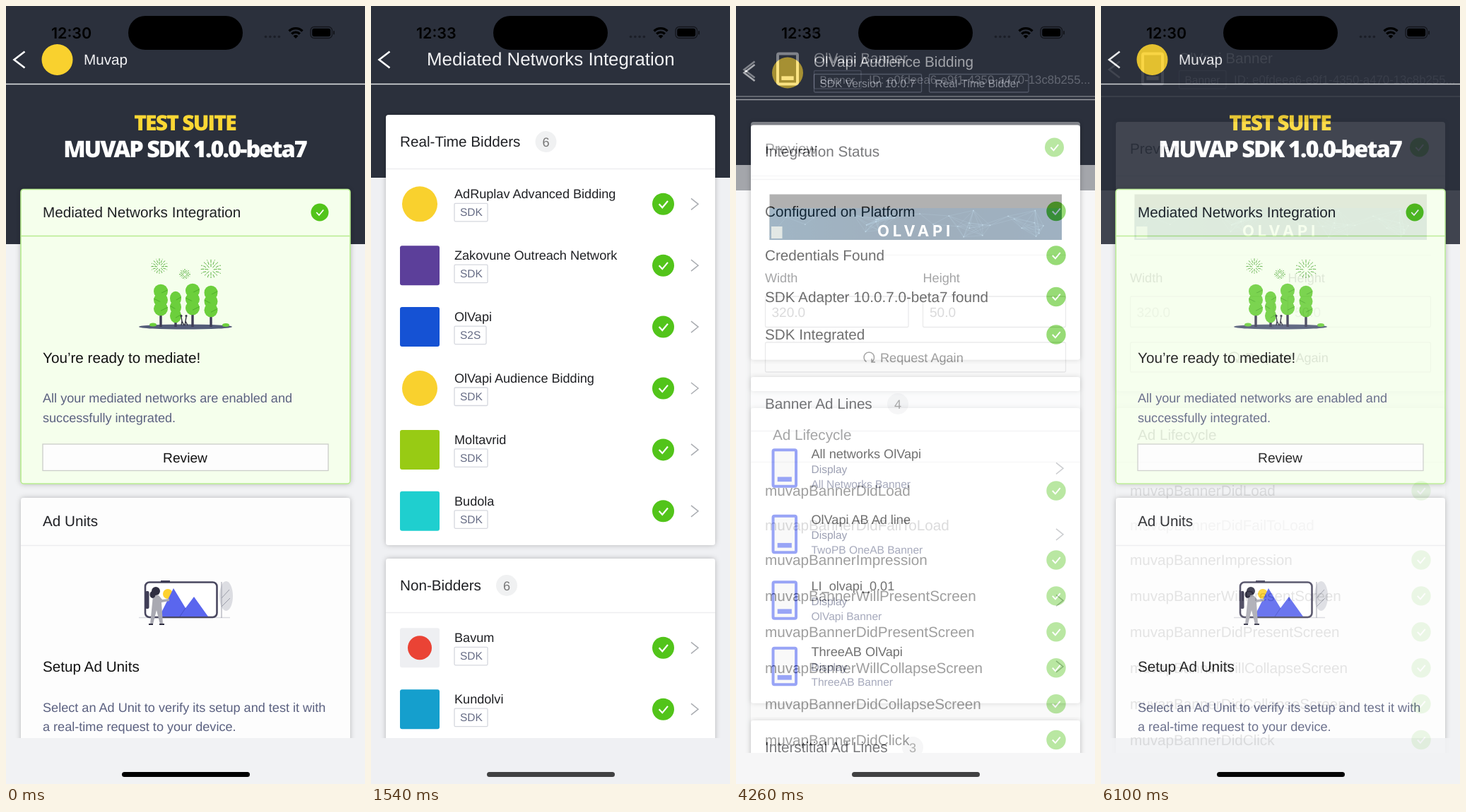
Recreate the animation shown at these times as an HTML page. Size 508 by 1101 pixels, loop 6.16 s.

```html
<!DOCTYPE html>
<html lang="en">
<head>
<meta charset="utf-8">
<title>Test suite walkthrough</title>
<style>
html, body { margin: 0; width: 100%; height: 100%; overflow: hidden; background: #2b303c; }
svg { display: block; width: 100vw; height: 100vh; }
text { font-family: "Liberation Sans", Arial, sans-serif; text-rendering: geometricPrecision; white-space: pre; }
.clock { font-family: Inter, sans-serif; font-weight: 600; }
.logo { font-family: Inter, sans-serif; font-weight: 700; letter-spacing: 4.8px; }
.title { font-family: "Open Sans", "Noto Sans", sans-serif; font-weight: 800; letter-spacing: -.06em; }
</style>
</head>
<body>
<svg id="stage" viewBox="0 0 508 1101" preserveAspectRatio="none" xmlns="http://www.w3.org/2000/svg"></svg>
<script>
const W = 508, H = 1101;
const DARK = '#2b303c', INK = '#1f2024', MUTED = '#5b6180', GREEN = '#52c41a',
      YELLOW = '#f9d12e', BLUE = '#5468f0', PALE = '#ededf0';
const SMALL = 15.5, BODY = 18.1, HEAD = 20.68, BIG = 25.85;

// Drawing helpers
const text = (x, y, size, str, fill = INK, more = '') =>
  `<text x="${x}" y="${y}" font-size="${size}" fill="${fill}" ${more}>${str}</text>`;
const title = (y, size, str, fill) =>
  text(253, y, size, str, fill, 'class="title" text-anchor="middle"');
const rect = (x, y, w, h, fill, more = '') =>
  `<rect x="${x}" y="${y}" width="${w}" height="${h}" fill="${fill}" ${more}/>`;
const circle = (x, y, r, fill, more = '') =>
  `<circle cx="${x}" cy="${y}" r="${r}" fill="${fill}" ${more}/>`;
const ellipse = (x, y, rx, ry, fill, more = '') =>
  `<ellipse cx="${x}" cy="${y}" rx="${rx}" ry="${ry}" fill="${fill}" ${more}/>`;
const path = (d, stroke, width, fill = 'none', more = '') =>
  `<path d="${d}" stroke="${stroke}" stroke-width="${width}" fill="${fill}" ${more}/>`;
const hline = (y, x1 = 21, x2 = 487, color = PALE, width = 1.3) =>
  path(`M${x1} ${y}H${x2}`, color, width);

const check = (x, y, r) => circle(x, y, r, GREEN) +
  path(`M${x - r * .38} ${y}l${r * .3} ${r * .32}l${r * .5} ${-r * .6}`, '#fff', r * .14);
const chevron = (x, y) => path(`M${x} ${y - 8}l10 8l-10 8`, '#aaadb2', 1.5);
const back = y => path(`M26.5 ${y - 11.5}L11.5 ${y}L26.5 ${y + 11.5}`, '#fff', 2.6);
const badge = (x, y, n) => circle(x, y, 15, '#f0f1f2') +
  text(x, y + 6.5, BODY, n, '#777', 'text-anchor="middle"');
const card = (y, h, fill = '#fff', more = '') =>
  rect(21, y, 466, h, fill, `rx="4" filter="url(#shadow)" ${more}`);
const tag = (x, y, w, str, stroke, fill) =>
  rect(x, y, w, 25.5, 'none', `rx="1.5" stroke="${stroke}" stroke-width="1.3"`) +
  text(x + 8, y + 18, SMALL, str, fill);
const device = (x, y, w, h, color, fill) =>
  rect(x, y, w, h, fill, `rx="2" stroke="${color}" stroke-width="4"`) +
  rect(x + w * .19, y + h * .74, w * .62, h * .13, color);

const page = (bg, dark, line) =>
  rect(0, 0, W, H, bg) + rect(0, 0, W, dark, DARK) + hline(line, 0, W, '#e4e5e8', 1.6);
const frame = (y, bg, clock, pill) =>
  rect(0, y, W, H - y, bg) + rect(164, 1084, 181, 7, pill, 'rx="3.5"') +
  text(64, 46, 21.5, clock, '#000', 'class="clock"');

// Illustrations
function firework(x, y, r) {
  let d = '';
  for (let k = 0; k < 16; k++) {
    const a = k * Math.PI / 8, c = Math.cos(a), s = Math.sin(a);
    const inner = r * (k % 2 ? .5 : .25), outer = r * (s > .5 ? .8 : 1);
    d += `M${x + c * inner} ${y + s * inner}Q${x + c * r * .8} ${y + s * r * .8 - r * .1} ` +
      `${x + c * outer} ${y + s * outer}`;
  }
  return path(d, '#55ad3c', 1, 'none', `stroke-dasharray="${r * .3} 1.3"`);
}

function tree(x, top, r) {
  let out = rect(x - 1.7, top + 30, 3.4, 454 - top - 30, '#3f3d56');
  [.22, .5, .78].forEach((f, i) => {
    const y = top + 44 * f;
    out += ellipse(x, y, r, 10, '#6ccf3c') +
      path(`M${x} ${y + 3}l${i % 2 ? -r : r} -5`, '#4fae2b', 1);
  });
  return out;
}

const park = () =>
  firework(217, 369, 12) + firework(253, 380, 8) + firework(290, 373, 15) +
  ellipse(254, 454, 66, 3.6, '#535b78') +
  ellipse(208, 451, 5, 2.5, '#6ccf3c') + ellipse(311, 451.5, 5, 2.5, '#6ccf3c') +
  tree(219, 394, 10) + tree(240, 404, 8) + tree(264, 393, 10) + tree(290, 396, 9.5) +
  path('M248 440l1 6l-1 6M249 446l3 6M255 440l-1 6l-1 6M254 446l3 6', '#2f2e41', 1.4) +
  circle(248, 438.5, 1.5, '#2f2e41') + circle(255, 438.5, 1.5, '#2f2e41');

const gallery = () =>
  hline(865.5, 188, 317, '#d9dae0') +
  ellipse(311.5, 835, 9.5, 21, '#dcdde2') +
  path('M305 815V866M305 850l12 -12M305 838l11 -12', '#9a9ca8', 1) +
  rect(197, 815.5, 101.5, 49.5, '#fff', 'rx="6" stroke="#4a4860" stroke-width="2.6"') +
  rect(197, 828, 5.5, 25, '#3f3d56', 'rx="2"') + rect(219, 813, 13, 3, '#3f3d56') +
  circle(229, 832, 7, '#fdd12f') +
  path('M217 864L237 824L254 852L266 836L286 864Z', 'none', 0, '#5a66ee') +
  path('M246 864L254 852', '#444fca', 1) +
  path('M208 834h8l5 6l10 -1v3l-11 2l2 31h-4l-5 -20l-5 20h-4l3 -30Z', 'none', 0, '#a9a9b2') +
  circle(212, 828, 6, '#2f2e41') + ellipse(207.5, 833, 4, 5, '#2f2e41') +
  path('M202 875h6M217 875h7', '#2f2e41', 2.2);

function mesh() {
  let seed = 7, d = '', dots = '';
  const rnd = () => (seed = (seed * 16807) % 2147483647) / 2147483647;
  const pts = Array.from({ length: 34 }, () => [47 + rnd() * 414, 287 + rnd() * 43]);
  pts.forEach((p, i) => {
    dots += circle(p[0], p[1], .9, '#8cc4e8', 'opacity=".6"');
    pts.slice(i + 1).forEach(q => {
      if (Math.hypot(p[0] - q[0], p[1] - q[1]) < 42) d += `M${p}L${q}`;
    });
  });
  return path(d, '#5fa4d0', .7, 'none', 'opacity=".3"') + dots;
}

// Screens
function home() {
  const bg = '#f1f2f4';
  return page(bg, 337, 110.5) + back(76) + circle(72.5, 76, 22, YELLOW) +
    text(110, 82.5, HEAD, 'Muvap', '#f2f2f4') +
    title(175.5, 30, 'TEST SUITE', '#fcd734') +
    title(214, 32.5, 'MUVAP SDK 1.0.0-beta7', '#fff') +
    card(259.5, 416.5, '#f5ffec', 'stroke="#b7eb8f" stroke-width="1.6"') +
    hline(325.5, 21, 487, '#b7eb8f', 1.6) +
    text(52, 299, HEAD, 'Mediated Networks Integration') + check(444, 292, 12.5) + park() +
    text(52, 505, HEAD, 'You’re ready to mediate!', '#111') +
    text(52, 561, BODY, 'All your mediated networks are enabled and', MUTED) +
    text(52, 589, BODY, 'successfully integrated.', MUTED) +
    rect(52, 620, 404, 37.5, '#fdfdfd', 'stroke="#cbcdc9" stroke-width="1.3"') +
    text(253.5, 646, 19.2, 'Review', '#111', 'text-anchor="middle"') +
    card(696, 380, '#fdfdfd') + hline(763.5) + text(52, 736, HEAD, 'Ad Units') + gallery() +
    text(52, 942, HEAD, 'Setup Ad Units', '#111') +
    text(52, 999, BODY, 'Select an Ad Unit to verify its setup and test it with', MUTED) +
    text(52, 1026, BODY, 'a real-time request to your device.', MUTED) +
    frame(1036, bg, '12:30', '#000');
}

function network(y, name, kind, icon) {
  return icon + text(118, y - 8, BODY, name) +
    tag(118, y - 1, kind === 'SDK' ? 47 : 45, kind, '#d5d7de', '#666c85') +
    check(413.5, y, 15.5) + chevron(453, y);
}

function networks() {
  const bg = '#eff0f3';
  const tile = color => y => rect(41, y - 28, 56, 56, color, 'rx="3"');
  const dot = y => circle(69, y, 25, YELLOW);
  const bidders = [
    ['AdRuplav Advanced Bidding', 'SDK', dot],
    ['Zakovune Outreach Network', 'SDK', tile('#5c3f9a')],
    ['OlVapi', 'S2S', tile('#1552d4')],
    ['OlVapi Audience Bidding', 'SDK', dot],
    ['Moltavrid', 'SDK', tile('#98cb14')],
    ['Budola', 'SDK', tile('#1fcfcf')]
  ];
  const others = [
    ['Bavum', 'SDK', y => tile('#eeeff2')(y) + circle(69, y, 17, '#ea4335')],
    ['Kundolvi', 'SDK', tile('#159fcd')]
  ];
  const rows = (list, top) => list.map(([name, kind, icon], i) => {
    const y = top + i * 86.9;
    return network(y, name, kind, icon(y));
  }).join('');
  return page(bg, 243, 110.5) + back(76) +
    text(79, 83.5, BIG, 'Mediated Networks Integration', '#f2f2f4') +
    card(154, 609) + text(41, 199, HEAD, 'Real-Time Bidders') + badge(247.5, 192, 6) +
    hline(230.5) + rows(bidders, 280.3) +
    card(782, 300) + text(41, 827, HEAD, 'Non-Bidders') + badge(192, 820, 6) +
    hline(858.5) + rows(others, 908.3) +
    frame(1036, bg, '12:33', '#414142');
}

function status() {
  const bg = '#f6f6f6';
  const steps = [['Configured on Platform', 290.5], ['Credentials Found', 353],
    ['SDK Adapter 10.0.7.0-beta7 found', 411.5], ['SDK Integrated', 465]];
  const lines = [['All networks OlVapi', 'All Networks Banner'], ['OlVapi AB Ad line', 'TwoPB OneAB Banner'],
    ['LI_olvapi_0.01', 'OlVapi Banner'], ['ThreeAB OlVapi', 'ThreeAB Banner']];
  return page(bg, 225, 132.5) + back(94.5) + circle(73, 94.5, 22, YELLOW) +
    text(110, 85.5, HEAD, 'OlVapi Audience Bidding', '#f2f2f4') +
    tag(110.5, 96.5, 152, 'SDK Version 10.0.7', '#6d7385', '#c3c6d0') +
    tag(273.5, 96.5, 140.5, 'Real-Time Bidder', '#6d7385', '#c3c6d0') +
    card(168.5, 332) + text(41, 213, HEAD, 'Integration Status') + hline(245.5) +
    steps.map(([s, y]) => text(41, y + 7, HEAD, s, '#111') + check(453, y, 13.7)).join('') +
    card(525, 461.5) + text(41, 570, HEAD, 'Banner Ad Lines') + badge(229, 563, 4) + hline(601.5) +
    lines.map(([name, note], i) => {
      const y = 654.3 + i * 93.5;
      return device(52.5, y - 26, 32.5, 51.5, BLUE, '#f5f5f5') +
        text(106.5, y - 14.5, BODY, name, '#111') + text(106.5, y + 6.5, SMALL, 'Display', MUTED) +
        text(106.5, y + 27.5, SMALL, note, '#6b7190') + chevron(453, y);
    }).join('') +
    card(1011, 90) + text(41, 1056, HEAD, 'Interstitial Ad Lines') + badge(250, 1049, 3) +
    frame(1057, bg, '12:33', '#414142');
}

function preview() {
  const bg = '#f6f7f9';
  const events = ['Load', 'FailToLoad', 'Impression', 'WillPresentScreen', 'DidPresentScreen',
    'WillCollapseScreen', 'DidCollapseScreen', 'DidClick'];
  const box = 'rx="2" stroke="#cdcdcf" stroke-width="1.3"';
  return page(bg, 261, 128) + back(90) + device(59, 67.5, 28, 43, '#fff', 'none') +
    text(110, 80.5, HEAD, 'OlVapi Banner', '#f2f2f4') +
    tag(110.5, 91.5, 66.5, 'Banner', '#6d7385', '#c3c6d0') +
    text(188, 110, 16.8, 'ID: e0fdeea6-e9f1-4350-a470-13c8b255...', '#b4b7c1') +
    card(164, 381) + text(41, 208.5, HEAD, 'Preview') + check(450.5, 200, 13.5) + hline(240.5) +
    rect(47.5, 266.5, 413.5, 64.5, '#3f3f3f') + rect(47.5, 286, 413.5, 45, 'url(#sea)') + mesh() +
    rect(50, 312, 15.5, 17, '#b9c8c0') +
    text(200, 326, 22, 'OLVAPI', '#fff', 'class="logo"') +
    hline(352.5, 41, 467) +
    text(41, 391, BODY, 'Width') + text(264.5, 391, BODY, 'Height') +
    rect(41.5, 411, 202.5, 43.5, '#fff', box) + rect(264.5, 411, 202, 43.5, '#fff', box) +
    text(50.5, 440, 19, '320.0', '#a5a5a8') + text(274, 440, 19, '50.0', '#a5a5a8') +
    rect(41.5, 476, 425, 42, '#fff', box) +
    path('M184.5 503.5a7.3 7.3 0 1 1 7.6 0M192 499v5h5', '#222', 1.5) +
    text(204, 503.5, BODY, 'Request Again', '#111') +
    card(569, 520) + text(52, 614, HEAD, 'Ad Lifecycle') + hline(645.5) +
    events.map((name, i) => {
      const y = i < 2 ? 686 + i * 49 : 784 + (i - 2) * 50.9;
      const did = i < 2 ? 'Did' : '', off = i === 1;
      return text(41, y + 7, HEAD, 'muvapBanner' + did + name, off ? '#a8a8aa' : '#111') +
        (off ? '' : check(453, y, 13.7));
    }).join('') +
    frame(1057, bg, '12:35', '#414142');
}

const statusBar = () =>
  rect(173, 14, 162, 48, '#000', 'rx="24"') +
  [367.5, 373.8, 380.1, 386.4].map(x => circle(x, 43.5, 1.8, '#1b1e27')).join('') +
  path('M400.5 35.5a13.5 13.5 0 0 1 19 0M404.2 39.5a8.2 8.2 0 0 1 11.6 0', '#000', 3.3) +
  path('M410 46l-3.4 -3.6a4.8 4.8 0 0 1 6.8 0Z', 'none', 0, '#000') +
  rect(431, 29.5, 30.5, 16, 'none', 'rx="5" stroke="#14161c" stroke-width="1.3"') +
  rect(433.2, 31.7, 26, 11.6, '#000', 'rx="3"') + rect(463, 35, 2, 5.5, '#14161c', 'rx="1"');

const stage = document.getElementById('stage');
stage.innerHTML = `<defs>
  <filter id="shadow" x="-5%" y="-5%" width="110%" height="110%">
    <feDropShadow dx="0" dy="0" stdDeviation="3.6" flood-color="#000" flood-opacity=".25"/>
  </filter>
  <linearGradient id="sea"><stop offset="0" stop-color="#164a70"/>
    <stop offset=".5" stop-color="#12385a"/><stop offset="1" stop-color="#123f66"/></linearGradient>
</defs>` +
  [home, networks, status, preview].map(draw => `<g class="screen">${draw()}</g>`).join('') + statusBar();

// Each screen holds for a second, then dissolves into the next in ten steps
const screens = [...stage.querySelectorAll('.screen')];
const LOOP = 6160, TURN = 1540, HOLD = 1000, STEP = 60;

function show(ms) {
  const t = ms % LOOP, now = Math.floor(t / TURN), into = t % TURN;
  const mix = into < HOLD ? 0 : (Math.floor((into - HOLD) / STEP) + 1) / 10;
  const next = (now + 1) % screens.length;
  const low = Math.min(now, next), high = Math.max(now, next);
  screens.forEach((s, i) => {
    const alpha = i === low ? 1 : i === high ? (high === next ? mix : 1 - mix) : 0;
    s.setAttribute('opacity', alpha);
    s.setAttribute('display', alpha ? 'inline' : 'none');
  });
}

const start = performance.now();
function tick() {
  show(performance.now() - start);
  requestAnimationFrame(tick);
}
show(0);
requestAnimationFrame(tick);
</script>
</body>
</html>
```
